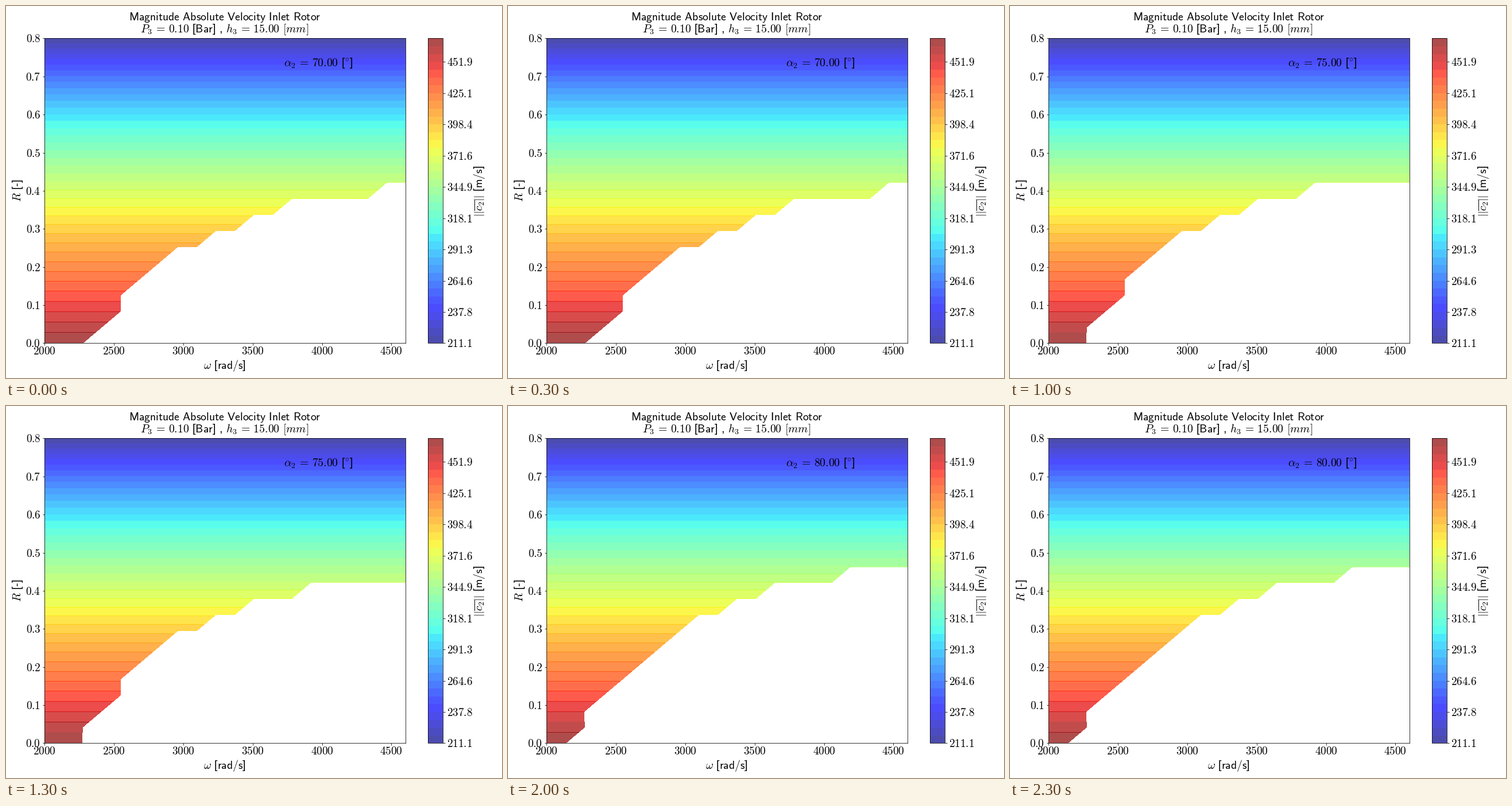
These frames come from a looping animation (864 px wide and 648 px high, 2500 ms). A matplotlib script:

```python
import numpy as np
import matplotlib.pyplot as plt
from matplotlib.animation import FuncAnimation

W, H, DPI = 864, 648, 72
FRAMES = 5
plt.rcParams.update({
    'font.family': 'Liberation Sans',
    'font.size': 19.65,
    'xtick.labelsize': 19.3,
    'ytick.labelsize': 19.3,
    'mathtext.fontset': 'cm',
})

SPACE = r'\hspace{0.379}'
EQUALS = r'\hspace{0.18}=\hspace{0.18}'

fig = plt.figure(figsize=(W / DPI, H / DPI), dpi=DPI, facecolor='white')


def add_axes(left, right, top=56.43, bottom=587.43):
    return fig.add_axes([left / W, 1 - bottom / H,
                         (right - left) / W, (bottom - top) / H])


def sans(s):
    return r'\mathsf{' + s.replace(' ', SPACE) + '}'


def unit(s):
    """Sans brackets around a unit, starting and ending outside math mode."""
    return '$' + SPACE + '$[$' + sans(s) + '$]$' + '{}$'


def put(x, y, s, ha='center', rotation=0):
    return fig.text(x / W, 1 - y / H, s, ha=ha, va='baseline',
                    rotation=rotation, rotation_mode='anchor')


def numbers(values, fmt='.1f'):
    return [f'${v:{fmt}}$' for v in values]


def angle_label(i):
    return (r'$\alpha_2' + EQUALS + sans(f'{70 + 2.5 * i:.2f}') + SPACE
            + r'$[$^{\circ}$]')


omega = np.linspace(2000, 4600, 20)
reaction = np.linspace(0, 0.8, 20)
rows = np.arange(20)[:, None]

# Absolute velocity falls with the square root of (1 - reaction).
speed = np.repeat(471.96 * np.sqrt(1 - reaction)[:, None], 20, axis=1)
levels = np.linspace(speed.min(), speed.max(), 40)


def lowest_row(i):
    """Lower limit of the valid region, in grid rows, for each speed."""
    columns = omega / (omega[1] - omega[0])
    start = max(17.59 - 0.33 * i, 16.6)
    height = 10.42 + 0.435 * i ** 0.7
    return height * (1 - (start / columns) ** 3.3)


ax = add_axes(67.25, 695.55)
cax = add_axes(734.8, 761.35)

layers = [
    ax.contourf(omega, reaction,
                np.ma.masked_where(rows < lowest_row(i), speed),
                levels=levels, cmap='jet', alpha=0.7)
    for i in range(FRAMES)
]

ax.set_xlim(2000, 4600)
ax.set_ylim(0, 0.8)
xt = np.arange(2000, 4501, 500)
yt = np.arange(9) / 10
ax.set_xticks(xt, labels=numbers(xt, 'd'))
ax.set_yticks(yt, labels=numbers(yt))
ax.tick_params(axis='x', pad=2.5)

bar = fig.colorbar(layers[0], cax=cax)
bar.set_ticks(levels[::4], labels=numbers(levels[::4]))
bar.minorticks_off()

put(381, 25, '$' + sans('Magnitude Absolute Velocity Inlet Rotor') + '$')
put(380.5, 46, '$P_3' + EQUALS + sans('0.10') + '$' + unit('Bar')
    + '$' + SPACE + '$,$' + SPACE + 'h_3' + EQUALS + sans('15.00')
    + SPACE + '[mm]$')
put(381, 632, r'$\omega$' + unit('rad/s'))
put(26.5, 321.5, '$R' + SPACE + '$[-]', rotation=90)
put(830, 322.5, r'$||\overline{c_2}||$' + unit('m/s'), rotation=90)
note = put(484.5, 105, angle_label(0), ha='left')


def update(i):
    for k, layer in enumerate(layers):
        layer.set_visible(k == i)
    note.set_text(angle_label(i))
    return [*layers, note]


anim = FuncAnimation(fig, update, frames=FRAMES, interval=500,
                     repeat=True, repeat_delay=0, blit=False)
plt.show()
```
